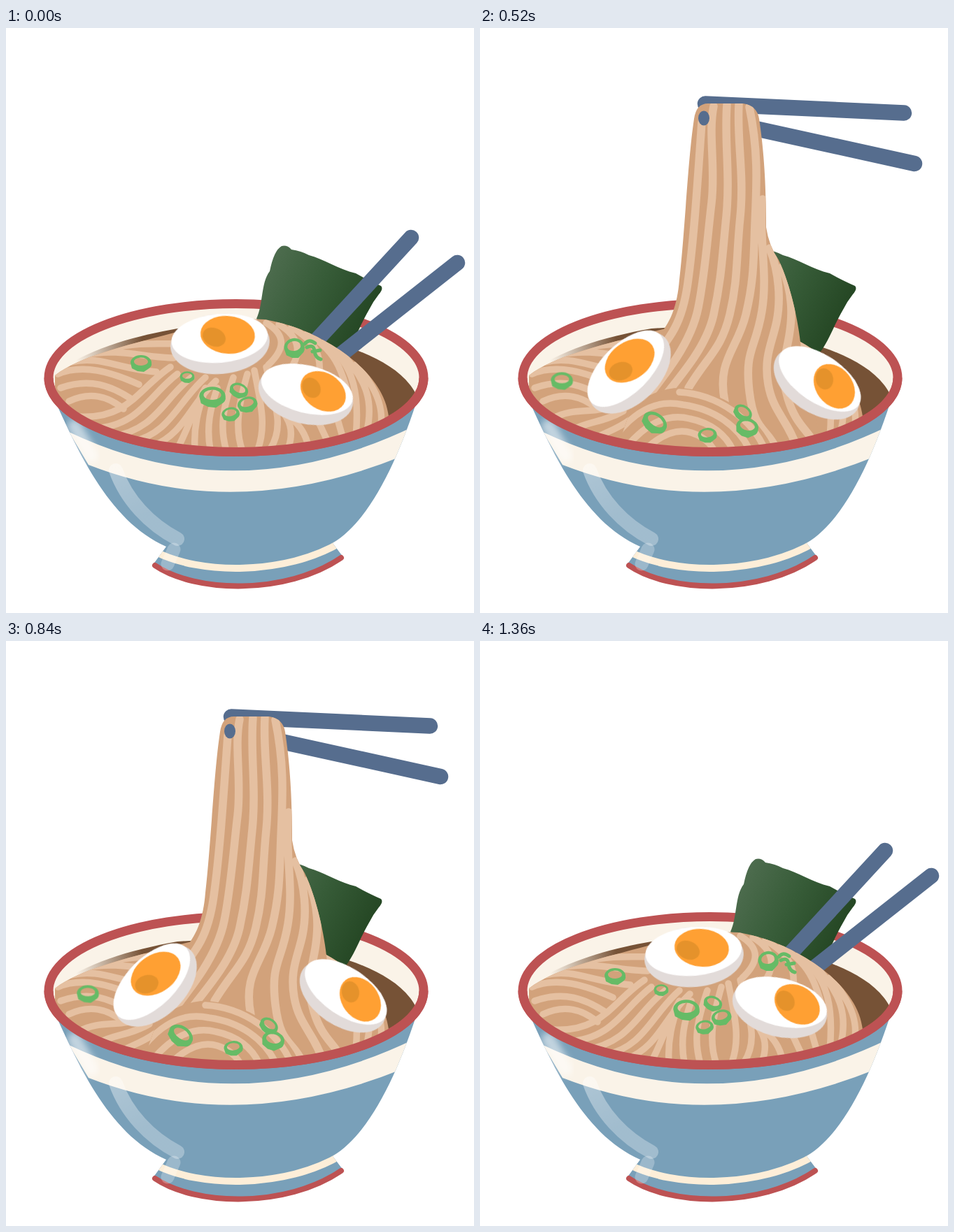
An HTML page without scripts that plays this animation: 669x837 px, repeating every 1.52 s.

```html
<!DOCTYPE html>
<html lang="en">
<head>
<meta charset="utf-8">
<title>Noodle bowl</title>
<style>
html, body { margin: 0; width: 100%; height: 100%; overflow: hidden; background: #fff; }
svg { display: block; width: 100vw; height: 100vh; }

.tan { fill: #d2a27b; }
.strand { fill: none; stroke: #e5c0a1; stroke-width: 9.5; stroke-linecap: round; }
.wide { stroke-width: 11.5; }
.stick { stroke: #566d8e; stroke-width: 22.5; stroke-linecap: round; }
.tip { fill: #566d8e; }
.rim { fill: none; stroke: #bd5253; stroke-width: 13; }
.onion { fill: #66bb66; fill-rule: evenodd; }

/* Poses: rest, grab, lift, high, top, then back down */
.rest, .grab, .lift, .high, .top, .pulled, .egg1, .egg2 {
  animation: 1520ms step-end infinite;
}
.grab, .lift, .high, .top, .pulled { visibility: hidden; }
.rest { animation-name: rest; }
.grab { animation-name: grab; }
.lift { animation-name: lift; }
.high { animation-name: high; }
.top { animation-name: top; }
.pulled { animation-name: pulled; }
.egg1 { animation-name: egg1; }
.egg2 { animation-name: egg2; }

@keyframes rest {
  0%, 89.473% { visibility: visible; }
  13.157% { visibility: hidden; }
}
@keyframes grab {
  0%, 23.684%, 89.473% { visibility: hidden; }
  13.157%, 76.315% { visibility: visible; }
}
@keyframes lift {
  0%, 34.21%, 76.315% { visibility: hidden; }
  23.684%, 65.789% { visibility: visible; }
}
@keyframes high {
  0%, 44.736%, 65.789% { visibility: hidden; }
  34.21%, 55.263% { visibility: visible; }
}
@keyframes top {
  0%, 55.263% { visibility: hidden; }
  44.736% { visibility: visible; }
}
@keyframes pulled {
  0%, 65.789% { visibility: hidden; }
  34.21% { visibility: visible; }
}
@keyframes egg1 {
  0%, 89.473%, 100% { transform: translate(306px, 452px) rotate(-5deg); }
  13.157%, 76.315% { transform: translate(250px, 484px) rotate(-27deg); }
  23.684%, 65.789% { transform: translate(230px, 488px) rotate(-36deg); }
  34.21%, 55.263% { transform: translate(214px, 493px) rotate(-45deg); }
  44.736% { transform: translate(207px, 495px) rotate(-48deg); }
}
@keyframes egg2 {
  0%, 89.473%, 100% { transform: translate(428.5px, 524.5px) rotate(14deg); }
  13.157%, 76.315% { transform: translate(456px, 518.5px) rotate(31deg); }
  23.684%, 65.789% { transform: translate(470px, 513px) rotate(32deg); }
  34.21%, 55.263% { transform: translate(481.5px, 508.5px) rotate(34deg); }
  44.736% { transform: translate(487px, 506px) rotate(35deg); }
}
</style>
</head>
<body>
<svg viewBox="0 0 669 837">
  <defs>
    <linearGradient id="leaf" gradientUnits="userSpaceOnUse" x1="370" y1="350" x2="510" y2="420">
      <stop offset="0" stop-color="#4d6c4e"/>
      <stop offset=".5" stop-color="#375c38"/>
      <stop offset="1" stop-color="#264825"/>
    </linearGradient>
    <linearGradient id="soup" gradientUnits="userSpaceOnUse" x1="100" y1="0" x2="195" y2="0">
      <stop offset="0" stop-color="#765236" stop-opacity="0"/>
      <stop offset="1" stop-color="#765236"/>
    </linearGradient>
    <linearGradient id="shine" gradientUnits="userSpaceOnUse" x1="150" y1="620" x2="190" y2="700">
      <stop offset="0" stop-color="#fff" stop-opacity=".4"/>
      <stop offset="1" stop-color="#fff" stop-opacity=".3"/>
    </linearGradient>
    <filter id="soft" x="-50%" y="-50%" width="200%" height="200%"><feGaussianBlur stdDeviation="5"/></filter>

    <path id="bowl" d="M62 515C100 600 145 705 229 742L210 768C270 808 400 812 482 757L467 737C520 705 560 620 590 525Z"/>
    <path id="mound" d="M70 497C105 470 165 456 240 436C290 424 330 414 370 417C410 424 440 438 465 453C510 480 540 515 546 550L548 561A267.5 106 0 0 1 70 530Z"/>
    <path id="lump" d="M235 440C285 425 290 400 305 378Q325 361 355 360Q378 360 382 378C392 405 405 425 440 445L470 605H230Z"/>
    <path id="column" d="M306 130Q309 108 326 108L376 108Q396 111 399 130C405 170 409 215 409 285Q413 312 427 332C444 368 455 418 459 458L490 605H195L250 445C270 428 282 400 285 360C293 290 297 190 306 130Z"/>

    <clipPath id="inBowl"><use href="#bowl"/></clipPath>
    <clipPath id="inMound"><use href="#mound"/></clipPath>
    <clipPath id="inLump"><use href="#lump"/></clipPath>
    <clipPath id="inColumn"><use href="#column"/></clipPath>
    <clipPath id="aboveRim">
      <ellipse cx="329" cy="500.5" rx="268" ry="106"/>
      <rect width="669" height="500"/>
    </clipPath>

    <g id="egg">
      <ellipse rx="71" ry="43" fill="#e2dbd9"/>
      <ellipse cy="-8" rx="69" ry="35" fill="#fff"/>
    </g>
    <g id="yolk">
      <ellipse rx="39" ry="27" fill="#ffa033"/>
      <ellipse cx="-19" cy="5" rx="17" ry="13" transform="rotate(18 -19 5)" fill="#e5922b"/>
    </g>
    <path id="ring" class="onion" d="M-15 0a15 11 0 0 1 30 0q1 6-5 9l-6 4-9-1-8-4zM-10-1a10 5.5 0 0 0 20-1a10 6 0 0 0-20 1z"/>

    <g id="pull">
      <use href="#column" class="tan"/>
      <g clip-path="url(#inColumn)">
        <path class="strand wide" d="M317 135C311 220 306 300 297 365S270 445 225 500
          M334 112C326 150 337 200 331 250S322 350 312 400S270 490 215 560
          M353 110C349 160 358 210 352 270S345 360 334 410S285 500 225 575
          M370 110C367 160 378 210 372 270S369 360 357 410S325 470 298 515
          M385 113C399 180 395 230 393 280S392 360 380 410S338 475 350 535
          M404 245C398 300 412 350 403 405S378 460 385 520S410 570 425 605
          M414 315C428 350 430 390 424 420S405 470 412 510S440 560 455 605
          M432 342C447 380 447 410 442 440S428 490 440 530S470 575 485 605"/>
        <path class="tan" d="M165 605C200 545 245 515 285 515C345 518 400 555 420 605Z"/>
        <path class="strand" d="M285 521C340 524 390 560 408 605M182 600C215 550 250 530 290 539C335 545 370 570 386 605
          M207 602C235 568 265 550 300 559C330 565 352 582 362 605M234 605C258 582 280 572 302 579Q325 586 335 605"/>
      </g>
    </g>
  </defs>

  <!-- Bowl -->
  <use href="#bowl" fill="#79a0b9"/>
  <g clip-path="url(#inBowl)">
    <path d="M90 578Q330 693 585 569L565 613Q330 708 118 625Z" fill="#faf3e8"/>
    <path d="M213 749C275 782 400 784 480 735" fill="none" stroke="#fdeed8" stroke-width="10"/>
    <path d="M98 570L122 612" stroke="#fff" stroke-opacity=".55" stroke-width="20" stroke-linecap="round" filter="url(#soft)"/>
  </g>
  <path d="M213 769C270 808 400 812 479 758" fill="none" stroke="#bd5253" stroke-width="8" stroke-linecap="round"/>
  <path d="M157 633C172 675 205 710 245 731" fill="none" stroke="url(#shine)" stroke-width="20" stroke-linecap="round"/>
  <path d="M240 746L231 767" stroke="#fff" stroke-opacity=".25" stroke-width="19" stroke-linecap="round"/>
  <ellipse cx="329" cy="500.5" rx="268" ry="106" fill="#faf3e8"/>
  <path d="M70 492C130 454 190 440 245 430L330 425L490 457C535 472 572 495 586 524L545 570L300 560Z" fill="url(#soup)"/>
  <ellipse class="rim" cx="329" cy="500.5" rx="268" ry="106"/>

  <path d="M358 416C368 395 364 365 377 348Q383 318 394 312Q402 310 408 317Q422 319 433 325C455 331 475 345 500 351Q514 359 536 369Q540 373 533 381Q525 391 519 403C507 423 500 445 487 463L440 470Z" fill="url(#leaf)"/>

  <!-- Chopsticks -->
  <g class="rest"><path class="stick" d="M430 462L579 300M475 470L645 336"/></g>
  <g class="grab"><path class="stick" d="M327 370L566 218M345 383L619 269"/></g>
  <g class="lift"><path class="stick" d="M322 209L596 118M326 224L629 196"/></g>
  <g class="high"><path class="stick" d="M322 108.5L606 121.5M326 129L621 194"/></g>
  <g class="top"><path class="stick" d="M322 78.5L606 96M326 99L620 171"/></g>

  <!-- Noodles -->
  <use href="#mound" class="tan"/>
  <g clip-path="url(#inMound)">
    <path class="strand" d="M74 495C110 480 150 492 190 510M92 478C135 468 160 488 215 492
      M112 468C160 457 200 472 240 472M150 459C185 449 215 452 260 452
      M78 515C120 500 150 512 178 530M90 534C120 520 145 526 168 545
      M455 450C500 480 505 530 500 585M475 461C520 505 525 540 515 580M500 482C535 520 540 550 535 575"/>
    <g class="rest">
      <path class="strand" d="M105 556C175 560 190 515 235 485M125 573C190 570 205 525 245 495M150 585C215 575 225 530 265 500
        M180 592C235 580 245 535 285 500M210 598C255 580 262 540 300 505
        M245 602C262 570 268 545 285 515M270 603C268 570 275 545 284 520M292 603C286 570 292 545 302 515
        M315 605C305 570 310 545 325 500M338 605C325 570 335 530 345 495M360 603C372 570 365 540 355 490
        M378 602C398 570 385 540 372 485M404 600C412 575 405 560 392 545M432 598C428 580 420 570 410 560M460 592L445 560M482 588L474 560"/>
      <path class="strand" d="M372 422C402 440 398 460 375 482M390 424C425 445 420 470 405 490
        M408 428C445 450 450 470 448 495M430 437C470 460 480 490 488 520"/>
    </g>
    <g class="grab">
      <path class="strand" d="M92 552C135 535 165 545 205 532M115 572C155 555 190 560 230 535M150 586C185 570 215 570 245 540M195 596C230 580 250 560 262 530"/>
    </g>
    <g class="pulled">
      <path class="strand" d="M105 558C130 545 150 550 175 545M130 576C155 562 175 565 205 548M160 589C180 578 195 575 215 560"/>
    </g>
  </g>

  <g clip-path="url(#aboveRim)">
    <g class="grab">
      <use href="#lump" class="tan"/>
      <g clip-path="url(#inLump)">
        <path class="strand" d="M318 377C300 400 300 420 262 440M327 393C310 420 322 440 285 475M340 396C328 430 340 450 312 490S280 530 270 560
          M358 385C348 430 352 445 328 490S300 530 290 550M372 378C362 425 372 440 350 475M380 380C388 425 410 440 405 480M388 405C398 430 420 440 435 455
          M318 510C370 500 420 540 475 580M300 528C360 520 400 560 460 600M285 547C340 540 380 570 430 605
          M262 566C320 560 350 575 395 605M240 585C285 575 320 585 350 605M350 478C390 480 420 520 460 548"/>
      </g>
      <path class="strand" d="M333 367C355 361 375 364 373 376"/>
      <path d="M327 382Q328 369 343 368Q357 368 355 382Q350 395 339 394Q329 392 327 382Z" class="tip"/>
      <path d="M349 368Q364 374 358 392" fill="none" stroke="#d2a27b" stroke-width="5"/>
    </g>
    <g class="lift">
      <use href="#pull" transform="translate(0 122.4) scale(1 .796)"/>
      <ellipse class="tip" cx="320" cy="225" rx="8" ry="10"/>
    </g>
    <g class="high">
      <use href="#pull"/>
      <ellipse class="tip" cx="320" cy="129" rx="8" ry="10.5"/>
    </g>
    <g class="top">
      <use href="#pull" transform="translate(0 -36.6) scale(1 1.061)"/>
      <ellipse class="tip" cx="320" cy="100" rx="8" ry="10.5"/>
    </g>
  </g>

  <!-- Toppings -->
  <g class="egg1">
    <use href="#egg"/>
    <use href="#yolk" transform="translate(12 -12) rotate(10)"/>
  </g>
  <g class="egg2">
    <use href="#egg" transform="scale(.97)"/>
    <use href="#yolk" transform="translate(23 -10.5) rotate(19) scale(.89 .97)"/>
  </g>

  <g class="rest">
    <use href="#ring" transform="translate(193 479)"/>
    <use href="#ring" transform="translate(259 499) scale(.7)"/>
    <use href="#ring" transform="translate(295 527) scale(1.25)"/>
    <use href="#ring" transform="translate(333 518) rotate(20) scale(.9)"/>
    <use href="#ring" transform="translate(321 552) rotate(-10) scale(.85)"/>
    <use href="#ring" transform="translate(345 538) rotate(-15) scale(.95)"/>
    <use href="#ring" transform="translate(412 457) rotate(-8) scale(.97 1.2)"/>
    <path d="M427 452Q433 444 442 451M430 457Q440 452 441 462T450 474M438 463L449 461" fill="none" stroke="#66bb66" stroke-width="5" stroke-linecap="round"/>
  </g>
  <g class="grab">
    <use href="#ring" transform="translate(147 496) rotate(-15)"/>
    <use href="#ring" transform="translate(197 535) scale(.83 .7)"/>
    <use href="#ring" transform="translate(265 550) scale(1.3 1.15)"/>
    <use href="#ring" transform="translate(315 571) rotate(-25) scale(.88)"/>
    <use href="#ring" transform="translate(332 532) rotate(10) scale(.97 .8)"/>
    <use href="#ring" transform="translate(349 546) rotate(-8) scale(1.1 .9)"/>
    <use href="#ring" transform="translate(452 456) rotate(10) scale(1.13 1.2)"/>
  </g>
  <g class="lift">
    <use href="#ring" transform="translate(131 500) rotate(-8)"/>
    <use href="#ring" transform="translate(257 558) rotate(12) scale(1.25)"/>
    <use href="#ring" transform="translate(320 577) rotate(-14) scale(.9)"/>
    <use href="#ring" transform="translate(355 542) rotate(20) scale(.9)"/>
    <use href="#ring" transform="translate(366 560) rotate(5) scale(1.05)"/>
  </g>
  <g class="pulled">
    <use href="#ring" transform="translate(117 504) scale(1.05)"/>
    <use href="#ring" transform="translate(250 564) rotate(35) scale(1.25 1.2)"/>
    <use href="#ring" transform="translate(325 582) rotate(-5) scale(.9)"/>
    <use href="#ring" transform="translate(376 550) rotate(35) scale(.92)"/>
    <use href="#ring" transform="translate(382 571) rotate(12) scale(1.07 1.15)"/>
  </g>

  <path class="rim" d="M61 500.5A268 106 0 0 0 597 500.5"/>
</svg>
</body>
</html>
```
